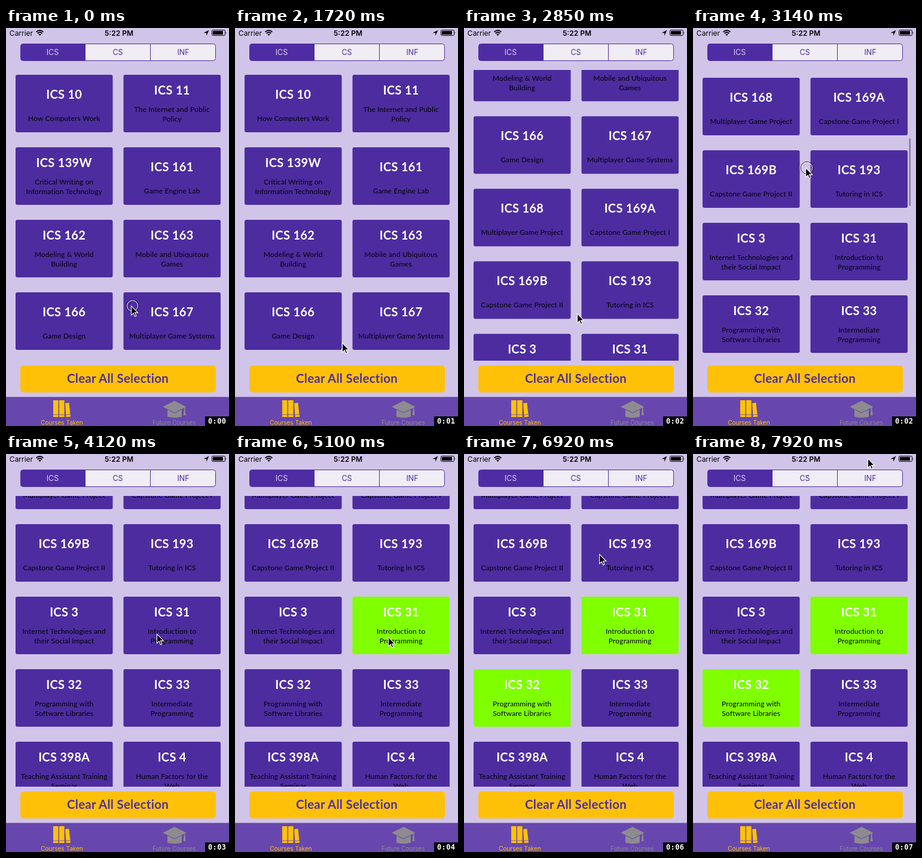
Recreate the animation shown at these times as an HTML page. Size 373x664 px, loop 8000 ms.

```html
<!DOCTYPE html>
<html lang="en">
<head>
<meta charset="utf-8">
<title>Course picker</title>
<style>
  html, body { margin: 0; width: 100%; height: 100%; overflow: hidden; background: #d1c4e9; }
  svg { display: block; width: 100vw; height: 100vh; }
  text { text-anchor: middle; font-family: Inter, sans-serif; }
  .code, .clear { font: 700 20px Lato, sans-serif; letter-spacing: .3px; fill: #fff; }
  .clear { font-size: 20.4px; fill: #4e2ca3; }
  .name { font: 400 12px Lato, sans-serif; letter-spacing: .15px; }
  .status { font-size: 12px; }
  .segment { font-size: 12.5px; fill: #4e2ca3; }
  .tab { font-size: 10px; }
  .clock { font: 700 12px "DejaVu Sans Mono", monospace; letter-spacing: .4px; fill: #fff; }
</style>
</head>
<body>
<svg viewBox="0 0 373 664">
  <defs><clipPath id="view"><rect y="70" width="373" height="485"/></clipPath></defs>
  <rect width="373" height="664" fill="#d1c4e9"/>

  <g class="status">
    <text x="25.5" y="12.5">Carrier</text>
    <text x="189" y="12.5" font-weight="600">5:22 PM</text>
    <path d="M50.5 6.6Q56.5 1.4 62.5 6.6M52.6 9Q56.5 5.6 60.4 9" fill="none" stroke="#000" stroke-width="1.8"/>
    <path d="M54.2 10.6Q56.5 8.8 58.8 10.6L56.5 13Z"/>
    <path d="M339.5 3.5L335.2 13V8.3H330.5Z"/>
    <rect x="344.5" y="3.5" width="22" height="9" rx="1.8" fill="none" stroke="#000"/>
    <rect x="346" y="5" width="17" height="6" rx=".6"/>
    <path d="M367.8 6.2Q369.6 8 367.8 9.8Z"/>
  </g>

  <rect x="24.5" y="26.5" width="326" height="28" rx="4" fill="#f0edf5"/>
  <path d="M133 26.5H28.5a4 4 0 0 0-4 4v20a4 4 0 0 0 4 4H133Z" fill="#4e2ca3"/>
  <rect x="24.5" y="26.5" width="326" height="28" rx="4" fill="none" stroke="#4e2ca3"/>
  <path d="M241.5 26.5v28" stroke="#4e2ca3"/>
  <g class="segment">
    <text x="78" y="45.3" style="fill:#dcd2ee">ICS</text>
    <text x="187" y="45.3">CS</text>
    <text x="296.5" y="45.3">INF</text>
  </g>

  <g clip-path="url(#view)">
    <g id="list"></g>
    <rect id="bar" x="361.5" width="2.5" height="113" rx="1.25" fill="#857c95"/>
  </g>

  <rect x="24" y="563" width="327" height="45" rx="5" fill="#ffc107"/>
  <text class="clear" x="187" y="592">Clear All Selection</text>

  <rect y="615.5" width="373" height="48.5" fill="#6747ad"/>
  <g fill="#ffc107">
    <path d="M79 621h8.6v28H79ZM89 621h8.6v28H89ZM99 626l6.4-.8 2.6 23.2-7.4.6Z"/>
    <path d="M79 645h8.6M89 645h8.6M100.2 645.4l7.6-.8" stroke="#6747ad" stroke-width=".8"/>
    <text class="tab" x="93.5" y="661.5">Courses Taken</text>
  </g>
  <g fill="#8d8b90">
    <path d="M262 632L282 622L301.5 632L282 641.5Z"/>
    <path d="M270 636.8L282 642.4L294 636.8V648.5Q282 652 270 648.5Z"/>
    <path d="M298 633h1.3l1.2 13h-3.7Z"/>
    <text class="tab" x="281.5" y="661.5">Future Courses</text>
  </g>
  <rect x="333" y="648" width="40" height="16"/>
  <text id="clock" class="clock" x="353.2" y="660.3"></text>

  <g id="cursor">
    <g id="ring" fill="none">
      <circle cx="2" r="10" stroke="#111"/>
      <circle cx="2" r="9" stroke="#fff"/>
    </g>
    <path d="M0 0V15.6L3.6 12.3L6 17.8L8.4 16.8L6 11.4H11Z" stroke="#fff" stroke-width="1.1"/>
  </g>
</svg>
<script>
const LOOP = 8000;
const STEP = 141.5;
const $ = id => document.getElementById(id);
const clamp = v => Math.min(1, Math.max(0, v));
const ease = p => p * p * (3 - 2 * p);

const courses = [
  ['10', 'How Computers Work'], ['11', 'The Internet and Public|Policy'],
  ['139W', 'Critical Writing on|Information Technology'], ['161', 'Game Engine Lab'],
  ['162', 'Modeling & World|Building'], ['163', 'Mobile and Ubiquitous|Games'],
  ['166', 'Game Design'], ['167', 'Multiplayer Game Systems'],
  ['168', 'Multiplayer Game Project'], ['169A', 'Capstone Game Project I'],
  ['169B', 'Capstone Game Project II'], ['193', 'Tutoring in ICS'],
  ['3', 'Internet Technologies and|their Social Impact'], ['31', 'Introduction to|Programming'],
  ['32', 'Programming with|Software Libraries'], ['33', 'Intermediate|Programming'],
  ['398A', 'Teaching Assistant Training|Seminar'], ['4', 'Human Factors for the|Web']
];

// Times in ms; each move eases the pointer on to the next place
const home = { x: 209, y: 463 };
const moves = [
  { at: 300, for: 1200, x: 179, y: 525 },
  { at: 1800, for: 500, x: 186, y: 268 },
  { at: 2300, for: 500, x: 189, y: 476 },
  { at: 2830, for: 333, x: 188, y: 217 },
  { at: 3820, for: 333, x: 256, y: 305 },
  { at: 5100, for: 550, x: 126, y: 410 },
  { at: 5960, for: 1710, x: 292, y: 7 }
];
const presses = [
  { down: 0, up: 140 },
  { down: 1800, up: 2250, flick: 294 },
  { down: 2950, up: 3250, flick: 272 },
  { down: 4360, up: 4660, pick: '31' },
  { down: 5650, up: 5800, pick: '32' }
];
const flicks = presses.filter(p => p.flick);

function pointer(t) {
  let { x, y } = home;
  for (const m of moves) {
    const p = ease(clamp((t - m.at) / m.for));
    x += (m.x - x) * p;
    y += (m.y - y) * p;
  }
  return [x + .5, y + .5];
}

function scrollAt(t) {
  return flicks.reduce((sum, f) =>
    sum + f.flick * (1 - Math.exp(-Math.max(0, t - f.down) / 143)), 0);
}

function barOpacity(t) {
  const last = flicks.filter(f => t >= f.down).pop();
  return last ? clamp((1000 - t + last.down) / 250) : 0;
}

function add(parent, tag, attrs, text = '') {
  const el = document.createElementNS('http://www.w3.org/2000/svg', tag);
  for (const key in attrs) el.setAttribute(key, attrs[key]);
  el.textContent = text;
  return parent.appendChild(el);
}

const cards = {};
courses.forEach(([code, name], i) => {
  const x = i % 2 ? 196.5 : 16;
  const y = 78 + 121 * Math.floor(i / 2);
  const mid = x + 81.2;
  const lines = name.split('|');
  const two = lines.length > 1;
  cards[code] = add($('list'), 'rect', { x, y, width: 162.5, height: 96, rx: 3 });
  add($('list'), 'text', { class: 'code', x: mid, y: y + (two ? 33 : 40) }, 'ICS ' + code);
  lines.forEach((line, n) =>
    add($('list'), 'text', { class: 'name', x: mid, y: y + (two ? 62 + 16 * n : 77) }, line));
});

function draw(time) {
  const t = Math.floor((time + 20) / STEP) * STEP;
  const offset = scrollAt(t);
  const pressed = presses.some(p => t >= p.down && t < p.up);
  $('cursor').setAttribute('transform', `translate(${pointer(t)})`);
  $('ring').setAttribute('visibility', pressed ? 'visible' : 'hidden');
  $('list').setAttribute('transform', `translate(0 ${-offset})`);
  $('bar').setAttribute('y', 72 + offset * .234);
  $('bar').setAttribute('opacity', barOpacity(t));
  for (const code in cards) {
    const picked = presses.some(p => p.pick === code && t >= p.up);
    cards[code].setAttribute('fill', picked ? '#80ff00' : '#4d2ca0');
  }
  $('clock').textContent = '0:0' + Math.floor(Math.max(0, t - 200) / 1000);
}

const start = performance.now();
function tick() {
  draw((performance.now() - start) % LOOP);
  requestAnimationFrame(tick);
}
tick();
</script>
</body>
</html>
```
